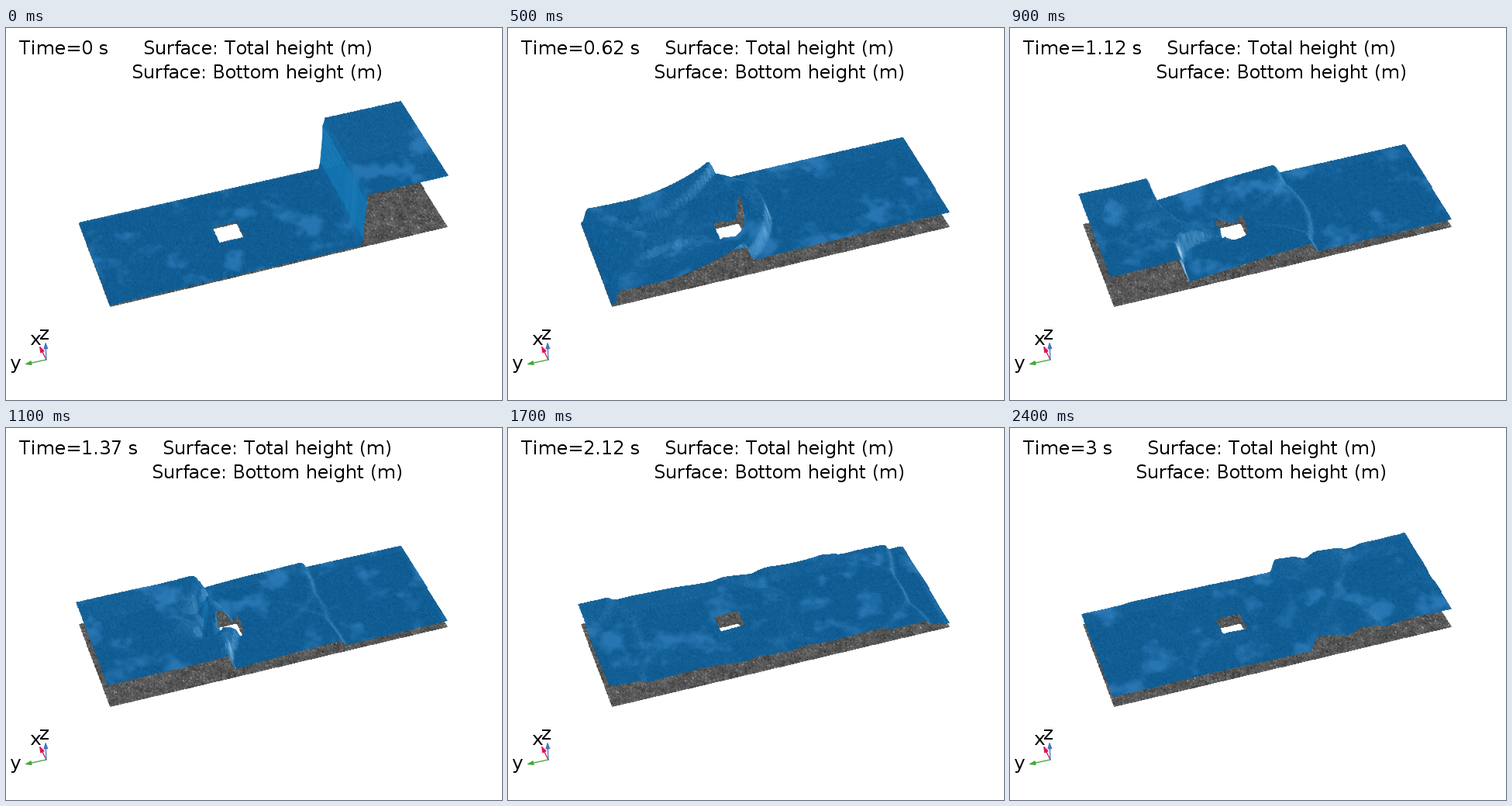
A matplotlib script that plays this animation: 640 px wide and 480 px high, repeating every 2500 ms.

```python
import matplotlib.pyplot as plt
import numpy as np
from matplotlib.animation import FuncAnimation

W, H, DPI = 640, 480, 80
FRAMES, INTERVAL, DT = 25, 100, 0.125
plt.rcParams.update({"text.hinting": "native", "text.hinting_factor": 1,
                     "text.kerning_factor": 6})
rng = np.random.default_rng(4)

# Tank of 1.6 x 0.61 m with a square column; x runs from the dam end
NX, NY, DX, G = 160, 61, 0.01, 9.81
DEEP, SHALLOW = 0.3, 0.01
solid = np.ones((NX + 2, NY + 2), bool)
solid[1:-1, 1:-1] = False
solid[90:102, 25:37] = True
fluid = (~solid).astype(float)


def smooth(x, a, b):
    s = np.clip((x - a) / (b - a), 0, 1)
    return s * s * (3 - 2 * s)


# --- Shallow water equations: split MUSCL-Hancock scheme, HLL flux ---

def primitive(q):
    return np.concatenate([q[:1], np.clip(q[1:] / q[0], -5, 5)])


def mirror(w):
    return np.stack([w[0], -w[1], w[2]])


def mass_momentum(w):
    h, vel = w[0], w[1]
    m = h * vel
    return np.stack([h, m]), np.stack([m, m * vel + G * h * h / 2])


def sweep(q, solid, r):
    w = primitive(q)
    d = np.diff(w, axis=1) * ~(solid[1:] | solid[:-1])
    a, b = d[:, :-1], d[:, 1:]
    same = a * b > 0
    s = np.zeros_like(w)
    s[:, 1:-1] = np.where(same, 2 * a * b / np.where(same, a + b, 1), 0)

    h, vel = w[0], w[1]
    half = w - r / 2 * np.stack([vel * s[0] + h * s[1],
                                 vel * s[1] + G * s[0], vel * s[2]])
    left, right = (half + s / 2)[:, :-1], (half - s / 2)[:, 1:]
    right = np.where(solid[1:], mirror(left), right)
    left = np.where(solid[:-1], mirror(right), left)
    for side in (left, right):
        np.maximum(side[0], 0.001, out=side[0])

    cl, cr = np.sqrt(G * left[0]), np.sqrt(G * right[0])
    lo = np.minimum(np.minimum(left[1] - cl, right[1] - cr), 0)
    hi = np.maximum(np.maximum(left[1] + cl, right[1] + cr), 0)
    (ul, fl), (ur, fr) = mass_momentum(left), mass_momentum(right)
    f = (hi * fl - lo * fr + lo * hi * (ur - ul)) / (hi - lo)
    drift = f[0] * np.where(f[0] > 0, left[2], right[2])
    f = np.concatenate([f, drift[None]])

    out = q.copy()
    out[:, 1:-1] -= r * np.diff(f, axis=1) * ~solid[1:-1]
    out[0] = np.maximum(out[0], 0.002)
    return out


def flip(q):
    return q[[0, 2, 1]].swapaxes(1, 2)


def simulate():
    x = (np.arange(NX + 2) - 0.5) * DX
    q = np.zeros((3, NX + 2, NY + 2))
    q[0] = (DEEP - (DEEP - SHALLOW) * smooth(x, 0.374, 0.405))[:, None]
    depths = [q[0]]
    for _ in range(FRAMES - 1):
        left = DT
        while left > 1e-9:
            speed = np.abs(primitive(q)[1:]).max(axis=0) + np.sqrt(G * q[0])
            dt = min(left, 0.8 * DX / speed.max())
            q = sweep(q, solid, dt / DX)
            q = flip(sweep(flip(q), solid.T, dt / DX))
            left -= dt
        depths.append(q[0])
    return depths


# --- Mesh: rows run right to left, columns far to near, as painted ---

def corners(a):
    return a[1:, 1:] + a[:-1, 1:] + a[1:, :-1] + a[:-1, :-1]


def refine(a):
    out = np.empty((2 * len(a) - 1, a.shape[1]))
    out[::2] = a
    out[1::2] = (a[1:] + a[:-1]) / 2
    return out


def surface_height(depth):
    return refine(corners(depth * fluid) / np.maximum(corners(fluid), 1))


# Screen positions: far-left, near-left, far-right, near-right
GROUND = np.array([(94, 253), (134, 359), (509, 159.5), (569, 256)])
LIFT = np.array([(-9.5, -65), (-8, -65), (0, -65.5), (1, -66)])
v, u = np.meshgrid(np.linspace(0, 1, NY + 1), np.linspace(1, 0, 2 * NX + 1))
in_hole = np.repeat(solid[1:-1, 1:-1], 2, axis=0)
SHAPE = in_hole.shape


def bilerp(c):
    return [(1 - u) * ((1 - v) * c[0, i] + v * c[1, i])
            + u * ((1 - v) * c[2, i] + v * c[3, i]) for i in (0, 1)]


gx, gy = bilerp(GROUND)
lx, ly = bilerp(LIFT)


# --- Colours ---

def clouds(su, sv):
    fv, fu = np.meshgrid(np.fft.fftfreq(SHAPE[1]), np.fft.fftfreq(SHAPE[0]))
    blur = np.exp(-(fu * su) ** 2 - (fv * sv) ** 2)
    n = np.fft.ifft2(np.fft.fft2(rng.normal(size=SHAPE)) * blur).real
    return (n - n.mean()) / n.std()


grain = rng.normal(size=SHAPE)
big, fine = clouds(36, 18), clouds(10, 6)


def blend(rgb, target, amount):
    a = np.clip(amount, 0, 1)[..., None]
    return rgb * (1 - a) + np.array(target) * a


def rgba(rgb):
    alpha = np.where(in_hole, 0.0, 1.0)[..., None]
    return np.concatenate([np.clip(rgb / 255, 0, 1), alpha], axis=2)


def water(h, k):
    along, across = np.diff(h, axis=0), np.diff(h, axis=1)
    along = (along[:, 1:] + along[:, :-1]) / DX
    across = (across[1:] + across[:-1]) / (2 * DX)
    steep = along + 0.4 * np.abs(across)
    patch = np.roll(big, (11 * k, 3 * k), (0, 1)) + 0.4 * np.roll(fine, 7 * k, 0)
    rgb = np.array((16, 94, 150)) + grain[..., None] * np.array((2, 4, 5))
    rgb = blend(rgb, (48, 128, 192), 0.4 * np.clip(patch - 0.5, 0, 1.8))
    rgb = blend(rgb, (85, 160, 215),
                np.clip(steep / 3, 0, 0.55) * (1 + 0.2 * grain))
    rgb = blend(rgb, (18, 125, 188), np.clip(-along / 8 - 0.3, 0, 0.7))
    foam = np.clip((steep - 3) / 4, 0, 0.9) * np.clip(0.6 + 0.4 * fine, 0, 1)
    return rgba(blend(rgb, (225, 242, 252), foam))


# --- Stage ---

fig = plt.figure(figsize=(W / DPI, H / DPI), dpi=DPI, facecolor="white")
ax = fig.add_axes([0, 0, 1, 1])
ax.set(xlim=(0, W), ylim=(H, 0))
ax.axis("off")


def mesh(x, y, colors, z):
    return ax.pcolormesh(x, y, colors, shading="flat", edgecolors="face",
                         linewidth=0.5, antialiased=True, zorder=z)


def label(x, y, s, **kw):
    return ax.text(x, y, s, family="DejaVu Sans", fontsize=24 * 72 / DPI,
                   color="black", va="baseline", **kw)


def arrow(tip, color):
    ax.annotate("", tip, (52, 428), zorder=5, arrowprops=dict(
        arrowstyle="-|>,head_length=0.5,head_width=0.17", mutation_scale=12,
        color=color, lw=1.2, shrinkA=0, shrinkB=0))


stone = 82 + 12 * grain + 5 * fine + 45 * (rng.random(SHAPE) > 0.96)
mesh(gx, gy, rgba(stone[..., None] + np.array((0, 1, 0))), 1)

arrow((24, 434), "#46a83c")
arrow((43, 410), "#dc145a")
arrow((51, 405), "#4678be")
label(12, 440, "y", ha="center")
label(39, 409, "x", ha="center")
label(50, 402, "z", ha="center")

clock = label(17, 34, "")
titles = [label(324.5, 34, "Surface: Total height (m)", ha="center"),
          label(324.5, 65, "Surface: Bottom height (m)", ha="center")]
heights = [surface_height(d) for d in simulate()]
surface = None


def update(k):
    global surface
    if surface is not None:
        surface.remove()
    h = heights[k]
    z = h / DEEP
    surface = mesh(gx + z * lx, gy + z * ly, water(h, k), 2)
    stamp = f"{int(k * DT * 100) / 100:g}"
    clock.set_text(f"Time={stamp} s")
    for title in titles:
        title.set_x(324.5 + max(0, 10 * len(stamp) - 15))
    return [surface, clock, *titles]


anim = FuncAnimation(fig, update, frames=FRAMES, interval=INTERVAL,
                     repeat=True, repeat_delay=0, blit=False)
plt.show()
```
